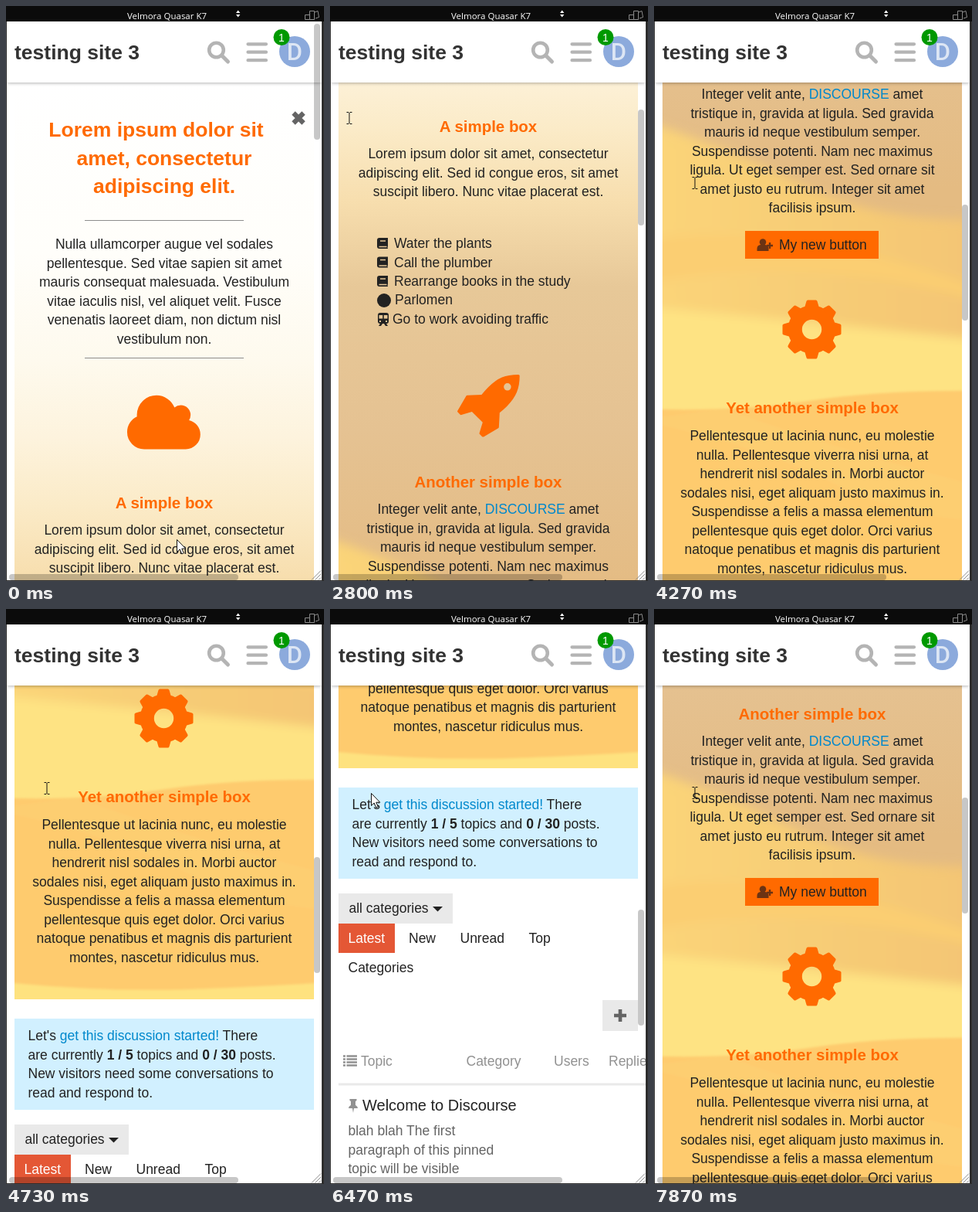
An HTML page that plays this animation: 412 px wide and 744 px high, repeating every 8 s.

```html
<!DOCTYPE html>
<html lang="en">
<head>
<meta charset="utf-8">
<title>Mobile preview</title>
<style>
  html, body { margin: 0; width: 100%; height: 100%; overflow: hidden; background: #2d2d2d; }
  body { font: 17.5px/24.5px "Liberation Sans", Arial, sans-serif; color: #222; }
  body, #stage { position: relative; }
  #stage { width: 412px; height: 744px; overflow: hidden; }
  #stage svg, #screen, #page, #page > *, header, .thumb { position: absolute; }
  #screen { left: 1px; top: 20px; width: 408px; height: 723px; overflow: hidden; background: #fff; }
  #page { left: -1px; top: -20px; width: 412px; height: 2400px; will-change: transform; }
  #page svg { left: 0; top: 0; }
  p, h1, h2, h3 { margin: 0; white-space: pre; }
  .mid { left: 11px; width: 388px; text-align: center; }
  h2 { font-size: 26.5px; line-height: 36.6px; color: #ff6a00; }
  h2 span { padding-right: 21px; }
  h3 { font-size: 20.45px; line-height: 23px; color: #ff6a00; }
  a { color: #08c; }
  .grey { color: #919191; }
  header { left: 0; top: 0; width: 408px; height: 79px; background: #fff; box-shadow: 0 2px 4px -1px rgba(0,0,0,.3); }
  h1 { position: absolute; left: 10px; top: 25px; font-size: 26.5px; line-height: 30px; color: #333; }
  .thumb { border-radius: 4px; background: rgba(0,0,0,.22); }
  #vbar { left: 399px; top: 23px; width: 8px; height: 150px; }
  #hbar { left: 4px; top: 735px; width: 297px; height: 8px; }
</style>
</head>
<body>
<div id="stage">
  <div id="screen">
    <div id="page">
      <svg width="412" height="2400">
        <defs>
          <linearGradient id="sky" x2="0" y2="1">
            <stop offset="0" stop-color="#fff"/>
            <stop offset=".13" stop-color="#fffefa"/>
            <stop offset=".21" stop-color="#fefaee"/>
            <stop offset=".27" stop-color="#fdf3dd"/>
            <stop offset=".32" stop-color="#fbebc8"/>
            <stop offset=".375" stop-color="#f7deae"/>
            <stop offset=".44" stop-color="#e7c898"/>
            <stop offset=".55" stop-color="#e5c292"/>
            <stop offset=".68" stop-color="#e4bb82"/>
          </linearGradient>
          <linearGradient id="sand">
            <stop offset="0" stop-color="#fbd579"/>
            <stop offset="1" stop-color="#f3c473"/>
          </linearGradient>
          <filter id="soft" x="-10%" y="-10%" width="120%" height="120%"><feGaussianBlur stdDeviation="7"/></filter>
          <filter id="crisp"><feGaussianBlur stdDeviation="1.5"/></filter>
        </defs>
        <svg x="11" y="99" width="388" height="1707" viewBox="11 99 388 1707">
          <rect x="11" y="99" width="388" height="1707" fill="url(#sky)"/>
          <g filter="url(#soft)">
            <path d="M-20 1170Q90 1205 190 1255T440 1300V1900H-20z" fill="url(#sand)"/>
            <path d="M-20 1330Q150 1290 440 1395V1410Q200 1340-20 1385z" fill="#fbce72"/>
            <path d="M-20 1412Q120 1425 220 1435T440 1458V1900H-20z" fill="#fee383"/>
          </g>
          <g filter="url(#crisp)">
            <path d="M-20 1545Q100 1550 200 1535T440 1522V1900H-20z" fill="#fecb6e"/>
            <path d="M-20 1560Q130 1590 230 1640T440 1690V1650Q240 1600 90 1545z" fill="#fdd074" opacity=".6"/>
            <path d="M-20 1782Q120 1797 240 1793T440 1782V1900H-20z" fill="#fee27f"/>
          </g>
        </svg>
        <path d="M102 277.5h206M102 455.5h206" stroke="#8d8d8d"/>
        <path d="M372.5 138.5l13 13m0-13l-13 13" stroke="#646464" stroke-width="6.2"/>
        <g fill="#ff6a00">
          <path transform="translate(153.8 497.5) scale(.0494)" d="M1984 1152q0 159-112.5 271.5t-271.5 112.5h-1088q-185 0-316.5-131.5t-131.5-316.5q0-132 71-241.5t187-163.5q-2-28-2-43 0-212 150-362t362-150q158 0 286.5 88t187.5 230q70-62 166-62 106 0 181 75t75 181q0 75-41 138 129 30 213 134.5t84 239.5z"/>
          <path transform="translate(163.5 964) scale(.0494)" d="M1440 320q0-40-28-68t-68-28-68 28-28 68 28 68 68 28 68-28 28-68zm224-288q0 249-75.5 430.5t-253.5 360.5q-81 80-195 176l-20 379q-2 16-16 26l-384 224q-7 4-16 4-12 0-23-9l-64-64q-13-14-8-32l85-276-281-281-276 85q-3 1-9 1-14 0-23-9l-64-64q-17-19-5-39l224-384q10-14 26-16l379-20q96-114 176-195 188-187 358-258t431-71q14 0 24 9.5t10 22.5z"/>
          <g id="gear" transform="translate(204.5 1442.5)">
            <path d="M0-31A31 31 0 1 1 0 31A31 31 0 1 1 0-31M0-12.7A12.7 12.7 0 1 0 0 12.7A12.7 12.7 0 1 0 0-12.7" fill-rule="evenodd"/>
          </g>
          <path d="M118 1315h173v36H118z"/>
        </g>
        <g fill="#6b3313">
          <circle cx="141" cy="1329.500" r="4.300"/>
          <path d="M133.500 1341v-3q0-4.500 4.500-5h6q4.500.5 4.500 5v3z"/>
          <path d="M150 1330v8m-4-4h8" stroke="#6b3313" stroke-width="2.4"/>
        </g>
        <g fill="#222">
          <g id="book"><path d="M64 836h11v11q-1 1 0 3H64q-3 0-3-3v-8q0-3 3-3z"/><path d="M63.500 847.500h10M65 840h7" stroke="#e6c696" stroke-width="1.4"/></g>
          <use href="#book" y="-24.500"/><use href="#book" y="-49"/>
          <circle cx="70" cy="868" r="9"/>
          <path d="M65 884h8q3 0 3 3v8q0 3-3 3l2 3h-3l-2-3h-2l-2 3h-3l2-3q-3 0-3-3v-8q0-3 3-3z"/>
          <path d="M63.500 887h4.700v4.500h-4.700zM69.800 887h4.700v4.500h-4.700zM64 894h2v2h-2zM72 894h2v2h-2z" fill="#e6c696"/>
        </g>
        <path d="M11 1831h388v118H11z" fill="#d1f0ff"/>
        <path d="M11 1968h148v39H11zM353 2106h46v40h-46zM11 2213.500h401v3H11z" fill="#e9e9e9"/>
        <path d="M133 1985h13l-6.500 6.500z" fill="#222"/>
        <path d="M11 2007h73v38H11z" fill="#e45735"/>
        <path d="M376 2118v16m-8-8h16" stroke="#646464" stroke-width="4.600"/>
        <path d="M17 2178.500h3m1.500 0H35M17 2182.500h3m1.500 0H35M17 2186.500h3m1.500 0H35M17 2190.500h3m1.500 0H35" stroke="#919191" stroke-width="2.600"/>
        <path d="M25.500 2234h9v2l-1.500 1v5q3 1.500 3 4h-5l-1 6-1-6h-5q0-2.500 3-4v-5l-1.500-1z" fill="#919191"/>
      </svg>

      <h2 class="mid" style="top:142px"><span>Lorem ipsum dolor sit</span>
amet, consectetur
adipiscing elit.</h2>
      <p class="mid" style="top:296px">Nulla ullamcorper augue vel sodales
pellentesque. Sed vitae sapien sit amet
mauris consequat malesuada. Vestibulum
vitae iaculis nisl, vel aliquet velit. Fusce
venenatis laoreet diam, non dictum nisl
vestibulum non.</p>
      <h3 class="mid" style="top:631px">A simple box</h3>
      <p class="mid" style="top:666px">Lorem ipsum dolor sit amet, consectetur
adipiscing elit. Sed id congue eros, sit amet
suscipit libero. Nunc vitae placerat est.</p>
      <p style="top:782px;left:83px">Water the plants
Call the plumber
Rearrange books in the study</p>
      <p style="top:855px;left:84px">Parlomen</p>
      <p style="top:880px;left:81px">Go to work avoiding traffic</p>
      <h3 class="mid" style="top:1091px">Another simple box</h3>
      <p class="mid" style="top:1126px">Integer velit ante, <a>DISCOURSE</a> amet
tristique in, gravida at ligula. Sed gravida
mauris id neque vestibulum semper.
Suspendisse potenti. Nam nec maximus
ligula. Ut eget semper est. Sed ornare sit
amet justo eu rutrum. Integer sit amet
facilisis ipsum.</p>
      <p style="top:1321px;left:162px">My new button</p>
      <h3 class="mid" style="top:1532px">Yet another simple box</h3>
      <p class="mid" style="top:1568px">Pellentesque ut lacinia nunc, eu molestie
nulla. Pellentesque viverra nisi urna, at
hendrerit nisl sodales in. Morbi auctor
sodales nisi, eget aliquam justo maximus in.
Suspendisse a felis a massa elementum
pellentesque quis eget dolor. Orci varius
natoque penatibus et magnis dis parturient
montes, nascetur ridiculus mus.</p>
      <p style="top:1841px;left:28.500px">Let's <a>get this discussion started!</a> There
are currently <b>1 / 5</b> topics and <b>0 / 30</b> posts.
New visitors need some conversations to
read and respond to.</p>
      <p style="top:1975px;left:24.500px">all categories</p>
      <p style="top:2014px;left:23.500px;color:#fff">Latest</p>
      <p style="top:2014px;left:102px">New</p>
      <p style="top:2014px;left:168.500px">Unread</p>
      <p style="top:2014px;left:257.500px">Top</p>
      <p style="top:2052px;left:23.500px">Categories</p>
      <p class="grey" style="top:2173px;left:40px">Topic</p>
      <p class="grey" style="top:2173px;left:176.500px">Category</p>
      <p class="grey" style="top:2173px;left:290px">Users</p>
      <p class="grey" style="top:2173px;left:361px">Replies</p>
      <p style="top:2230px;left:42px;font-size:20px">Welcome to Discourse</p>
      <p style="top:2263px;left:23.500px;color:#646464">blah blah The first
paragraph of this pinned
topic will be visible</p>
    </div>
    <header><h1>testing site 3</h1></header>
  </div>

  <div class="thumb" id="vbar"></div>
  <div class="thumb" id="hbar"></div>

  <svg width="412" height="744">
    <path d="M0 0h412v20H0z" fill="#0b0b0b"/>
    <path d="M.5 20v724" stroke="#2d2d2d"/>
    <text x="157" y="17" font-family="Open Sans, sans-serif" font-size="11.500" fill="#fff">Velmora Quasar K7</text>
    <path d="M298 9l2.700-3.500L303.400 9zM298 11h5.400l-2.700 3.500z" fill="#fff"/>
    <g fill="none" stroke="#8a8a8a">
      <path d="M393.500 6.500h6v11h-6zM393 11.500h-5.500v6h6M400 8l4-1.500 1.500 8-4.500 1.500"/>
    </g>
    <g fill="none" stroke="#b4b4b4">
      <circle cx="272.500" cy="57" r="9.300" stroke-width="4.600"/>
      <path d="M279.500 64l8 8" stroke-width="5" stroke-linecap="round"/>
      <path d="M313.500 49.300h23.500M313.500 59.700h23.500M313.500 70.200h23.500" stroke-width="4.200" stroke-linecap="round"/>
    </g>
    <circle cx="374" cy="59" r="20" fill="#8caadc"/>
    <text x="374" y="70" text-anchor="middle" font-family="Roboto, sans-serif" font-size="31" font-weight="500" fill="#dde6f4">D</text>
    <circle cx="357" cy="40.500" r="10.500" fill="#090"/>
    <text x="357" y="45.500" text-anchor="middle" font-size="14" fill="#fff">1</text>
    <path d="M396 742.500l12-12M400.500 742.500l7.500-7.500M405 742.500l3-3" stroke="#8a8a8a"/>
    <g id="cursor">
      <path id="arrow" d="M.5.5v16l3.700-3.500 2.500 6 2.600-1.100-2.500-5.700h5z" fill="#fff" stroke="#111"/>
      <path id="beam" d="M-3.500-7.500h2.500l1 1 1-1h2.500M0-6.500v13M-3.500 7.500h2.500l1-1 1 1h2.500" fill="none" stroke="#111"/>
    </g>
  </svg>
</div>

<script>
const $ = id => document.getElementById(id);
const LOOP = 8000, TICKS = 120;

// [tick, scroll]
const scroll = [[31, 0], [32, 2], [33, 25], [35, 110], [44, 595], [46, 640], [52, 640], [53, 655],
  [57, 747], [71, 1301], [74, 1415], [75, 1430], [79, 1430], [85, 1559], [87, 1592], [89, 1600],
  [102, 1600], [103, 1590], [108, 1407], [118, 967]];
// [tick, x, y]
const pointer = [[2, 221, 690], [3, 226, 722], [5, 290, 690], [7, 360, 597], [9, 388, 640],
  [13, 388, 640], [17, 270, 430], [22, 60, 165], [26, 16, 132], [30, 25, 145], [52, 25, 145],
  [57, 47, 210], [63, 53, 229], [71, 53, 232], [79, 53, 232], [85, 53, 236], [89, 53, 237],
  [96, 53, 237], [97, 53, 238]];
// ticks during which the text cursor shows
const beamSpans = [[23, 53], [63, 88], [104, 120]];

function at(track, k, i = 1) {
  const n = track.findIndex(p => p[0] > k);
  if (n === 0) return track[0][i];
  if (n < 0) return track[track.length - 1][i];
  const a = track[n - 1], b = track[n];
  return Math.round(a[i] + (b[i] - a[i]) * (k - a[0]) / (b[0] - a[0]));
}

function draw(ms) {
  const k = Math.floor((ms + 5) % LOOP / LOOP * TICKS);
  const s = at(scroll, k);
  const beam = beamSpans.some(([from, to]) => k >= from && k < to);
  $('page').style.transform = `translateY(${-s}px)`;
  $('vbar').style.transform = `translateY(${Math.round(s / 4.37)}px)`;
  $('cursor').setAttribute('transform', `translate(${at(pointer, k)} ${at(pointer, k, 2)})`);
  $('arrow').style.display = beam ? 'none' : '';
  $('beam').style.display = beam ? '' : 'none';
}

for (let a = 0; a < 360; a += 45) {
  $('gear').insertAdjacentHTML('beforeend',
    `<path transform="rotate(${a})" d="M-9.500-28L-7-36.500Q-6.600-38-5.200-38H5.200Q6.600-38 7-36.500L9.500-28z"/>`);
}

const start = performance.now();
(function loop() {
  draw(performance.now() - start);
  requestAnimationFrame(loop);
})();
</script>
</body>
</html>
```
